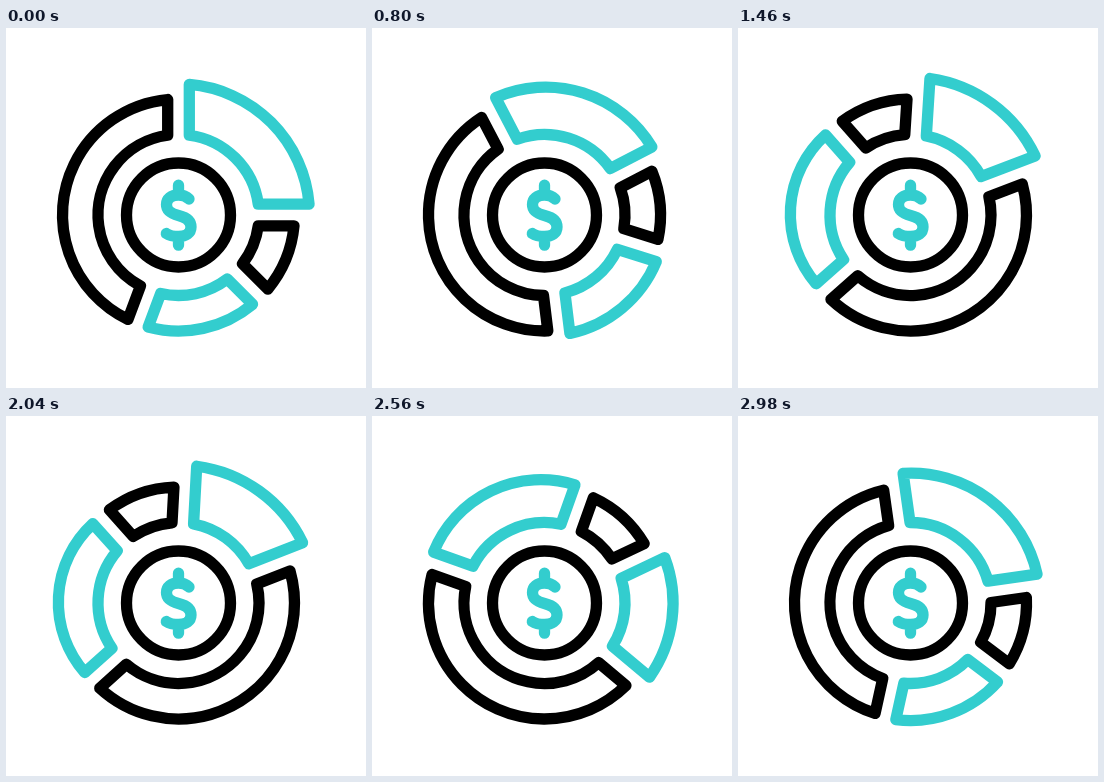
Recreate the animation shown at these times as an HTML page with a canvas. Size 360 by 360 pixels, loop 3 s.

```html
<!DOCTYPE html>
<html lang="en">
<head>
<meta charset="utf-8">
<title>Budget chart</title>
<style>
html, body { margin: 0; width: 100%; height: 100%; overflow: hidden; background: #fff; }
canvas { display: block; width: 360px; height: 360px; }
</style>
</head>
<body>
<canvas id="stage" width="360" height="360"></canvas>
<script>
const ctx = document.getElementById('stage').getContext('2d');
const BLACK = '#000', TEAL = '#33cdce';
const CX = 172.5, CY = 187, INNER = 80.5, RIM = 116, GAP = 10.8;
const LOOP = 3000, TURN = -135, PEAK = 1800, BACK_END = 3345;
const rad = d => d * Math.PI / 180;
const dollar = new Path2D(
  'M172.5 157.2V166M172.5 209V217.2' +
  'M183 171C180.5 168.5 177 167 172.5 167C165 167 160.5 171 160.5 176.5' +
  'C160.5 183 165 185.5 172.5 187.5C180.5 189.5 185 193 185 199' +
  'C185 205 180 208.5 172.5 208.5C167.5 208.5 163.5 207.8 160.3 205.5');

// Bezier ease (a,0)-(b,1), solved by bisection.
function ease(p, a, b) {
  let lo = 0, hi = 1, u = 0.5;
  for (let i = 0; i < 30; i++) {
    u = (lo + hi) / 2;
    const x = 3 * a * u * (1 - u) ** 2 + 3 * b * u * u * (1 - u) + u ** 3;
    if (x < p) lo = u; else hi = u;
  }
  return u * u * (3 - 2 * u);
}

function progress(t) {
  return t < PEAK
    ? ease(t / PEAK, 0.865, 0.23)
    : 1 - ease((t - PEAK) / (BACK_END - PEAK), 0.66, 0.34);
}

// Ring piece whose straight sides run parallel to the dividing rays.
// The outer arc passes its corners at radius edge and its middle at radius crest.
function piece(from, to, color, edge, crest = edge) {
  const a = rad(from), b = rad(to), mid = (a + b) / 2;
  const i = Math.asin(GAP / INNER);
  const half = (b - a) / 2 - Math.asin(GAP / edge);
  const along = edge * Math.cos(half);
  const shift = (crest ** 2 - edge ** 2) / (2 * (crest - along));
  const span = Math.atan2(edge * Math.sin(half), along - shift);
  ctx.beginPath();
  ctx.arc(CX + shift * Math.cos(mid), CY + shift * Math.sin(mid),
    crest - shift, mid - span, mid + span);
  ctx.arc(CX, CY, INNER, b - i, a + i, true);
  ctx.closePath();
  ctx.strokeStyle = color;
  ctx.stroke();
}

function draw(t) {
  const s = progress(t), r = TURN * s;
  const lead = k => s + k * s * (1 - s);
  const shrink = lead(0.4);
  ctx.fillStyle = '#fff';
  ctx.fillRect(0, 0, 360, 360);
  ctx.lineJoin = ctx.lineCap = 'round';
  ctx.lineWidth = 11.3;

  piece(r + 110.5, r + 270, BLACK, RIM);
  piece(r - 90, r, TEAL, 131 - 14.5 * shrink, 131 - 11 * shrink);
  piece(r, r + 45, BLACK, RIM);
  piece(r + 45, r + 110.5, TEAL, RIM + 22.4 * lead(0.15));

  ctx.beginPath();
  ctx.arc(CX, CY, 52, 0, 2 * Math.PI);
  ctx.strokeStyle = BLACK;
  ctx.stroke();

  ctx.strokeStyle = TEAL;
  ctx.stroke(dollar);
}

const start = performance.now();
function tick() {
  draw((performance.now() - start) % LOOP);
  requestAnimationFrame(tick);
}
tick();
</script>
</body>
</html>
```
